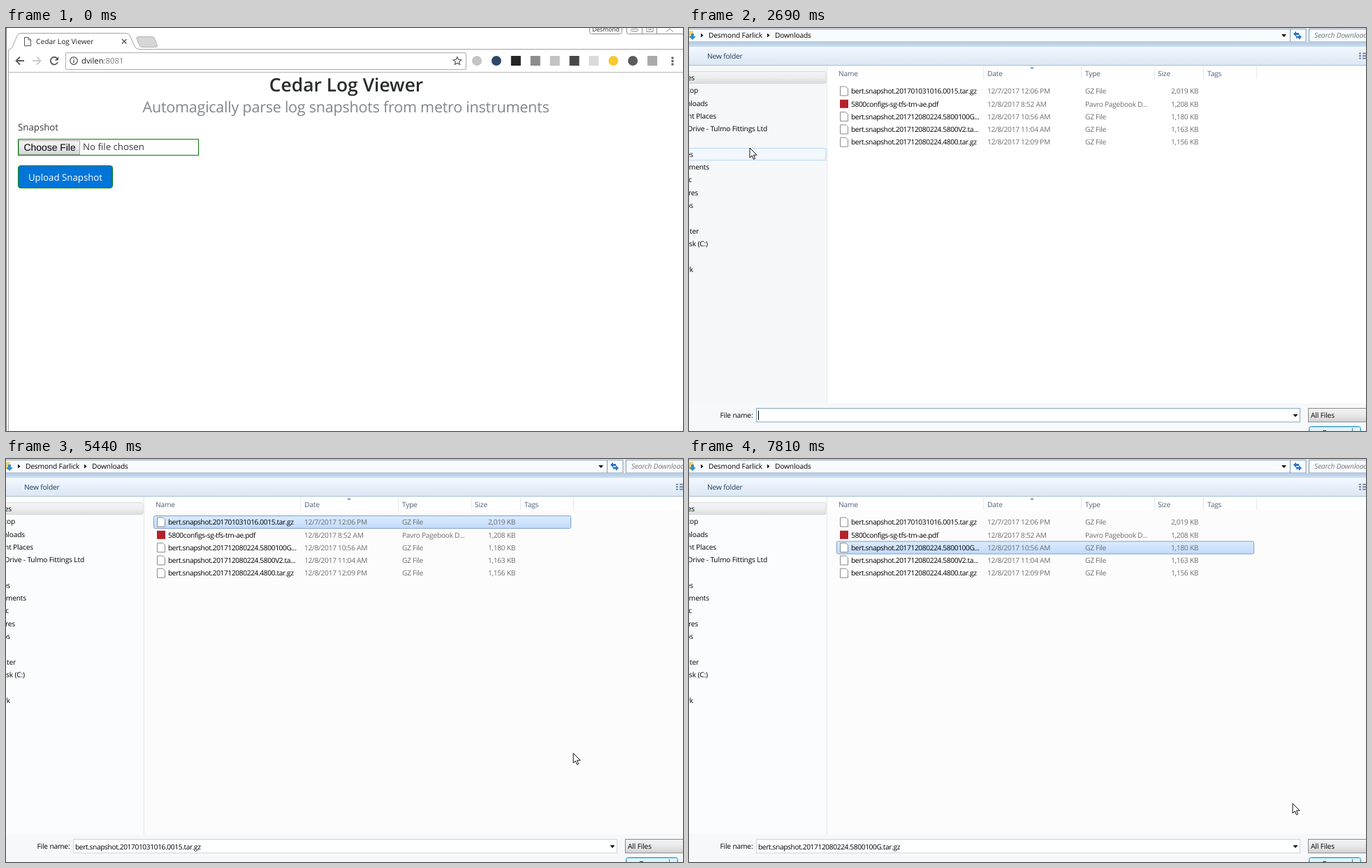
Animation, 969 px wide and 578 px high, one loop 8000 ms. Source, as an HTML page:

```html
<!DOCTYPE html>
<html lang="en">
<head>
<meta charset="utf-8">
<title>Log snapshot upload</title>
<style>
html, body { margin: 0; width: 100%; height: 100%; overflow: hidden; background: #fff; }
svg { display: block; width: 100vw; height: 100vh; }
text { font-family: "Open Sans", "Noto Sans", sans-serif; text-rendering: geometricPrecision; white-space: pre; }
.form { font-size: 13.25px; fill: #373a3c; }
.small { font-size: 10.2px; letter-spacing: -.15px; }
.file { letter-spacing: -.38px; }
.meta { letter-spacing: -.28px; fill: #6d6d6d; }
.head { fill: #4c607a; }
.end { text-anchor: end; }
.mid { text-anchor: middle; }
.line { fill: none; stroke: #5a5a5a; stroke-width: 1.8; }
</style>
</head>
<body>
<svg viewBox="0 0 969 578" preserveAspectRatio="none">
  <defs>
    <linearGradient id="bar" x2="0" y2="1"><stop stop-color="#f3f8fd"/><stop offset="1" stop-color="#dbe7f5"/></linearGradient>
    <linearGradient id="strip" x2="0" y2="1"><stop stop-color="#b4cbe4"/><stop offset="1" stop-color="#cddff2"/></linearGradient>
    <linearGradient id="grey" x2="0" y2="1"><stop stop-color="#f3f3f3"/><stop offset=".5" stop-color="#e9e9e9"/><stop offset="1" stop-color="#d2d2d2"/></linearGradient>
    <linearGradient id="chosen" x2="0" y2="1"><stop stop-color="#dcebfc"/><stop offset="1" stop-color="#c1dbfc"/></linearGradient>
  </defs>

  <g id="browser">
    <rect width="969" height="578" fill="#fff"/>
    <!-- tabs and window buttons -->
    <path d="M4 30.5C9 30 9 27 11 23L16 11Q17.500 7.500 21 7.500H172Q176 7.500 177.500 11L184 26Q186 30.500 190 30.500H969" fill="none" stroke="#a3a3a3"/>
    <path d="M189 12.500H209Q211 12.500 212 14L216.500 25Q217 27.500 214 27.500H195Q192 27.500 191 25L187 15Q186.500 12.500 189 12.500Z" fill="#d6d6d6" stroke="#b4b4b4"/>
    <path d="M26.500 13.500H32L35.500 17V25.500H26.500ZM32 13.500V17H35.500" fill="#fff" stroke="#555"/>
    <text x="43" y="23" class="small" style="letter-spacing:0" fill="#222">Cedar Log Viewer</text>
    <path d="M166 16L172.500 22.500M172.500 16L166 22.500" class="line" style="stroke-width:1.500"/>
    <g fill="#fff" stroke="#8c8c8c">
      <rect x="835.500" y="-8" width="46" height="16.500" rx="3"/>
      <rect x="888.500" y="-8" width="90" height="16.500" rx="3"/>
      <path d="M910.500 0V8M931.500 0V8"/>
      <rect x="894.500" y="1.500" width="10" height="3" rx="1"/>
      <path d="M917 0V5.500H926V0M920 0V2.500H923V0" fill="none"/>
      <path d="M945 5.500L950 1L955 5.500" fill="none"/>
    </g>
    <text x="858.500" y="5" class="mid" font-size="8.600" fill="#222">Desmond</text>
    <!-- toolbar -->
    <path d="M26 47H15M20 41.500L14.500 47L20 52.500" class="line"/>
    <path d="M38 47H49M44 41.500L49.500 47L44 52.500" class="line" style="stroke:#ccc"/>
    <path d="M73 43.500A5.300 5.300 0 1 0 74 49" class="line"/>
    <path d="M75 41V46.500H69.500Z" fill="#5a5a5a"/>
    <rect x="85.500" y="35.500" width="573" height="24" rx="1.500" fill="#fff" stroke="#adadad"/>
    <circle cx="97" cy="47" r="5.300" fill="none" stroke="#555" stroke-width="1.200"/>
    <path d="M97 46V50M97 43.500V45" stroke="#555" stroke-width="1.400"/>
    <text x="108" y="51" font-size="11.300" fill="#222">dvilen<tspan fill="#808080">:8081</tspan></text>
    <path d="M646 41.500L647.700 45.300L651.700 45.700L648.700 48.400L649.600 52.400L646 50.300L642.400 52.400L643.300 48.400L640.300 45.700L644.300 45.300Z" fill="none" stroke="#555" stroke-width="1.200"/>
    <g id="addons"></g>
    <path d="M952.500 41.500h3v3h-3zM952.500 46h3v3h-3zM952.500 50.500h3v3h-3z" fill="#5a5a5a"/>
    <path d="M4 63.500H969" stroke="#b5b5b5"/>
    <path d="M.5 0V578" stroke="#777"/>
    <path d="M3.500 31V578" stroke="#aaa"/>
    <!-- page -->
    <text x="487" y="91" class="mid" font-size="26.400" font-weight="600" fill="#292b2c">Cedar Log Viewer</text>
    <text x="486.500" y="121" class="mid" font-size="21.600" letter-spacing="-.27" fill="#7f888f">Automagically parse log snapshots from metro instruments</text>
    <text x="17" y="147" class="form">Snapshot</text>
    <rect x="17.500" y="159.500" width="258" height="23" fill="#fff" stroke="green"/>
    <rect x="18.500" y="161.500" width="87" height="20" fill="url(#grey)" stroke="#a6a6a6"/>
    <text x="25.500" y="176" font-size="13.900" style="font-family:'Liberation Sans',Arial,sans-serif">Choose File</text>
    <text x="110" y="175" class="form">No file chosen</text>
    <rect x="17.500" y="197.500" width="135" height="32" rx="3.500" fill="#0275d8" stroke="green"/>
    <text x="85" y="219" class="form mid" style="fill:#fff">Upload Snapshot</text>
  </g>

  <g id="dialog">
    <rect width="969" height="578" fill="#fff"/>
    <!-- path bar -->
    <rect y="0" width="969" height="21" fill="#e4eef9"/>
    <rect x="-5" y="1.500" width="888" height="18.500" fill="#f8fbfe" stroke="#8c9db0"/>
    <rect x="887.500" y="1.500" width="100" height="18.500" fill="#f8fbfe" stroke="#8c9db0"/>
    <path d="M-2 4H6V15H-2Z" fill="#f1d27a"/>
    <path d="M3 8H7V12H10L5 17L0 12H3Z" fill="#2d8fd0"/>
    <path d="M17 7.500L20.500 10.500L17 13.500ZM112 7.500L115.500 10.500L112 13.500ZM848 9H855L851.500 13Z" fill="#111"/>
    <text x="28" y="14" class="small">Desmond Farlick</text>
    <text x="123" y="14" class="small">Downloads</text>
    <path d="M860.500 2V20" stroke="#8c9db0"/>
    <path d="M865 8.500L869 4.500V7H873V10H869V12.500ZM877 13L873 9V11.500H869V14.500H873V17Z" fill="#2c74c4"/>
    <text x="895" y="14" class="small" font-style="italic" fill="#777">Search Downloads</text>
    <!-- command bar -->
    <rect y="20.500" width="969" height="6.500" fill="url(#strip)"/>
    <rect y="27" width="969" height="26" fill="url(#bar)"/>
    <path d="M0 53.500H969" stroke="#a9bdd3"/>
    <text x="26" y="44" class="small" fill="#1e395b">New folder</text>
    <path d="M959 36.500h3M959 40h3M959 43.500h3M964 36.500h8M964 40h8M964 43.500h8" stroke="#7889a0" stroke-width="2"/>
    <!-- folders -->
    <rect id="side" y="54" width="197" height="484"/>
    <rect x="-5" y="62.500" width="201" height="17" rx="2" fill="url(#grey)" stroke="#d9d9d9" fill-opacity=".75"/>
    <rect id="sideHover" x="-5" y="172.500" width="201" height="17" rx="2" fill="#f2f8fe" stroke="#b8d6f0"/>
    <g id="folders"></g>
    <path d="M197.500 54V538" stroke="#e3e8ee"/>
    <!-- files -->
    <rect id="list" x="198" y="74" width="771" height="464" fill="#fcfcfc"/>
    <path d="M421.500 55V73M561.500 55V73M666.500 55V73M736.500 55V73M812.500 55V73" stroke="#e2e8ef"/>
    <path d="M488 58.500L491 55.500L494 58.500Z" fill="#7196b8"/>
    <rect id="hover" x="211.500" width="597" height="18" rx="2" fill="#f3f9fe" stroke="#b8d6f4"/>
    <rect id="selected" x="211.500" width="597" height="18" rx="2" fill="url(#chosen)" stroke="#7da2ce"/>
    <g id="files"></g>
    <!-- footer -->
    <rect y="538" width="969" height="40" fill="#f6f8fa"/>
    <text x="91.500" y="559" class="small end">File name:</text>
    <rect id="field" x="96.500" y="545.500" width="778" height="19.500" fill="#fff"/>
    <text id="name" x="99" y="559.500" class="small file"></text>
    <path id="caret" d="M99.500 549V562" stroke="#000"/>
    <path d="M864.500 554H871.500L868 558Z" fill="#111"/>
    <rect x="886.500" y="545.500" width="100" height="19.500" fill="url(#grey)" stroke="#8a8a8a"/>
    <text x="890" y="559" class="small">All Files</text>
    <rect x="887.500" y="571.500" width="74" height="20" rx="3" fill="#e4f3fa" stroke="#3795bd"/>
    <rect x="888.500" y="572.500" width="72" height="18" rx="2" fill="none" stroke="#7fdcf7"/>
    <path d="M949.500 574V578" stroke="#3b7f9e"/>
    <path d="M907 577.500H912" stroke="#333"/>
  </g>

  <circle id="ring" r="8.500" fill="none" stroke="#222" stroke-width="1.200"/>
  <path id="cursor" d="M0 0V14L3.200 11L5.400 16.300L7.600 15.300L5.400 10.200H10Z" fill="#fff" stroke="#111" stroke-linejoin="round"/>
</svg>
<script>
const LOOP = 8000;
const $ = id => document.getElementById(id);
const show = (id, on) => $(id).style.display = on ? '' : 'none';
const label = (x, y, text, cls = '') => `<text x="${x}" y="${y}" class="small ${cls}">${text}</text>`;
const rowTop = i => 81.5 + 18.3 * i;

const addons = [
  ['o', '#c4c4c4'], ['o', '#2d4866'], ['s', '#242424'], ['s', '#8d8d8d'], ['s', '#c2c2c2'],
  ['s', '#484848'], ['s', '#dadada'], ['o', '#fbc72e'], ['o', '#5b5b5b'], ['s', '#aaa']
];
$('addons').innerHTML = addons.map(([shape, color], i) => {
  const x = 674 + 27.9 * i;
  return shape === 'o'
    ? `<circle cx="${x}" cy="47" r="7" fill="${color}"/>`
    : `<rect x="${x - 7}" y="40" width="14" height="14" fill="${color}"/>`;
}).join('');

// Folder names run off the left edge: [right end, row, name]
const folders = [
  [8, 0, 'Favorites'], [13, 1, 'Desktop'], [27, 2, 'Downloads'], [39, 3, 'Recent Places'],
  [112, 4, 'Drive - Tulmo Fittings Ltd'], [6, 6, 'Libraries'], [29, 7, 'Documents'],
  [4, 8, 'Music'], [13, 9, 'Pictures'], [6, 10, 'Videos'], [14, 12, 'Computer'],
  [27, 13, 'Local Disk (C:)'], [6, 15, 'Network']
];
$('folders').innerHTML = folders.map(([x, row, name]) => label(x, 75 + 18.3 * row, name, 'end')).join('');

const files = [
  ['bert.snapshot.201701031016.0015.tar.gz', '12/7/2017 12:06 PM', 'GZ File', '2,019 KB'],
  ['5800configs-sg-tfs-tm-ae.pdf', '12/8/2017 8:52 AM', 'Pavro Pagebook D...', '1,208 KB'],
  ['bert.snapshot.201712080224.5800100G...', '12/8/2017 10:56 AM', 'GZ File', '1,180 KB'],
  ['bert.snapshot.201712080224.5800V2.ta...', '12/8/2017 11:04 AM', 'GZ File', '1,163 KB'],
  ['bert.snapshot.201712080224.4800.tar.gz', '12/8/2017 12:09 PM', 'GZ File', '1,156 KB']
];
const heads = [[214, 'Name'], [427, 'Date'], [567, 'Type'], [671, 'Size'], [742, 'Tags']];
$('files').innerHTML = heads.map(([x, text]) => label(x, 69, text, 'head')).join('') +
  files.map(([name, date, type, size], i) => {
    const y = rowTop(i), base = y + 12.7;
    const icon = name.endsWith('pdf')
      ? `<rect x="216" y="${y + 3}" width="12" height="12" fill="#b5202a"/>`
      : `<path d="M216.500 ${y + 2.5}h8l3 3v10h-11z" fill="#fff" stroke="#8b8b8b"/>`;
    return icon + label(232, base, name, 'file') + label(427, base, date, 'meta') +
      label(567, base, type, 'meta') + label(729, base, size, 'meta end');
  }).join('');

// Pointer stops: [time, x, y]
const stops = [
  [500, 440, 401], [690, 355, 335], [870, 261, 257], [1230, 240, 218], [1420, 221, 186],
  [1780, 180, 181], [1960, 135, 176], [2140, 102, 173], [2320, 87, 172],
  [3620, 140, 165], [3800, 240, 139], [3980, 336, 108], [4160, 322, 102], [4340, 306, 95], [4520, 300, 91],
  [5270, 560, 260], [5440, 812, 422], [5810, 740, 380], [5990, 560, 270], [6170, 380, 160],
  [6360, 308, 120], [6540, 306, 122], [6720, 305, 124],
  [7260, 350, 170], [7450, 560, 320], [7630, 780, 450], [7810, 864, 494]
];
const within = (t, from, to) => t >= from && t < to;

function draw(t) {
  const stop = stops.filter(s => s[0] <= t).pop();
  const open = t >= 2690;
  show('browser', !open);
  show('dialog', open);
  show('cursor', stop);
  show('ring', within(t, 4520, 4710) || within(t, 6900, 7080));
  if (!stop) return;

  const [, x, y] = stop;
  $('cursor').setAttribute('transform', `translate(${x} ${y})`);
  $('ring').setAttribute('transform', `translate(${x} ${y})`);

  const chosen = t < 4520 ? -1 : t < 6900 ? 0 : 2;
  const row = Math.floor((y - rowTop(0)) / 18.3);
  const over = x > 211 && x < 809 && row >= 0 && row < files.length && row !== chosen;
  show('hover', over);
  $('hover').setAttribute('y', rowTop(row));
  show('selected', chosen >= 0);
  $('selected').setAttribute('y', rowTop(chosen));
  show('sideHover', t < 3620);
  show('list', t >= 3620);
  $('side').setAttribute('fill', t < 3620 ? '#f6f7f9' : '#fbfcfd');
  show('caret', t < 3070 || within(t, 3620, 4520));
  $('field').setAttribute('stroke', t < 4710 ? '#86a9c4' : '#cdd5dd');
  $('name').textContent = chosen < 0 ? '' : files[chosen][0].replace('...', '.tar.gz');
}

const start = performance.now();
(function tick() {
  draw((performance.now() - start) % LOOP);
  requestAnimationFrame(tick);
})();
</script>
</body>
</html>
```
